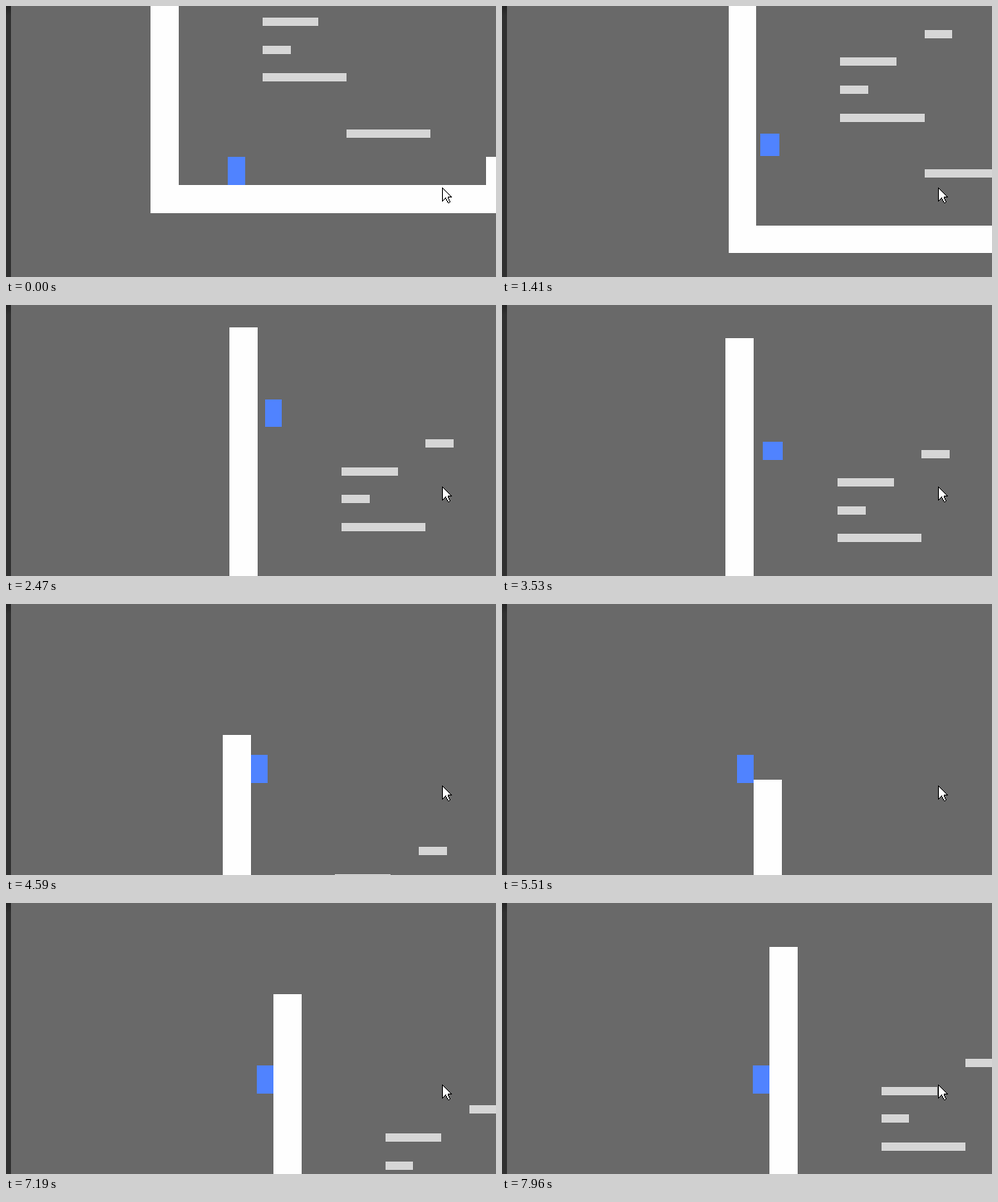
An HTML page with a canvas that plays this animation: 590x327 px, repeating every 7.99 s.

```html
<!DOCTYPE html>
<html lang="en">
<head>
<meta charset="utf-8">
<title>Wall jump</title>
<style>
  html, body { margin: 0; width: 100%; height: 100%; overflow: hidden; background: #696969; }
  canvas { display: block; }
</style>
</head>
<body>
<canvas id="stage" width="590" height="327"></canvas>
<script>
const ctx = document.getElementById('stage').getContext('2d');
const LOOP = 7990, TILE = 33.7, WALL_H = 11 * TILE;
const GRAVITY = 2000, SLIDE = 73.5;            // px/s², px/s
const BODY_W = 20.2, KICK_S = 0.278, SQUASH_S = 0.12;
const INSIDE = TILE + BODY_W / 2, OUTSIDE = -BODY_W / 2;
const STAND = -TILE / 2, ON_TOP = STAND - WALL_H;

// Smoothstep from key to key, [time, value]
function ease(keys, t) {
  if (t <= keys[0][0]) return keys[0][1];
  const i = keys.findIndex(k => k[0] > t);
  if (i < 0) return keys[keys.length - 1][1];
  const [t0, v0] = keys[i - 1], [t1, v1] = keys[i];
  const u = (t - t0) / (t1 - t0);
  return v0 + (v1 - v0) * u * u * (3 - 2 * u);
}

// Camera: wall's left edge on the stage, moved by pans of [start, end, distance]
const PANS = [[510, 1250, 98.6], [2230, 2470, -3.3], [3530, 3760, -8.3],
              [4980, 5900, 69], [6210, 6700, -8.1]];
const wallX = t => PANS.reduce((x, [a, b, dx]) => x + ease([[a, 0], [b, dx]], t), 174);

// Camera: wall's top edge, turning points; then it settles on the long slide
const TURNS = [[510, -154.7], [1050, -106.1], [1410, -106.1], [1850, 14], [2290, -8],
               [2711, 82], [3490, 40.3], [3530, 40.3], [3980, 124], [4220, 114],
               [4590, 157.9], [4740, 152], [5200, 214], [5450, 214], [6100, 128], [6210, 131]];
function wallY(t) {
  if (t < 6210) return ease(TURNS, t);
  const s = (t - 6210) / 1000;
  return 181.9 - SLIDE * s - 50.8 * Math.exp(-5.4 * s);
}

// Hops: start time, centre height from the floor, kick direction, sliding speed after the arc
const HOPS = [
  [610, STAND, 0, SLIDE],
  [1386, -79, 1, SLIDE],
  [2230, -198, 1, SLIDE],
  [3470, -197.7, 1, SLIDE],
  [4200, -286.6, 1, SLIDE],
  [4700, -321.5, 1, 0],
  [5450, ON_TOP, 0, 173],
  [5930, -311.8, -1, SLIDE],
  [LOOP, -208.8, 0, 0]
];
const RUNS = [[510, 103.5], [830, INSIDE], [4980, INSIDE], [5500, OUTSIDE]];

function player(t) {
  const x = ease(RUNS, t);
  const i = HOPS.findIndex(h => h[0] > t) - 1;
  if (i < 0) return { x, y: STAND, squash: 0 };
  const [t0, y0, kick, slide] = HOPS[i], [t1, y1] = HOPS[i + 1];
  const s = (t - t0) / 1000;

  // Launch speed that makes arc plus slide end where the next hop starts
  const net = y0 - y1 + slide * (t1 - t0) / 1000;
  const v = Math.sqrt(2 * GRAVITY * net) - slide;
  const arc = Math.min(s, (v + slide) / GRAVITY);
  const y = y0 - v * arc + GRAVITY * arc * arc / 2 + slide * (s - arc);

  const out = 1009 * s * Math.max(0, KICK_S - s);
  const squash = kick && s < SQUASH_S ? Math.sin(Math.PI * s / SQUASH_S) : 0;
  return { x: x + kick * out, y, squash };
}

function box(x, y, w, h, color) {
  const l = Math.round(x), t = Math.round(y);
  ctx.fillStyle = color;
  ctx.fillRect(l, t, Math.round(x + w) - l, Math.round(y + h) - t);
}

// Mouse arrow, row by row: outlined head, then the tail
function cursor(x, y) {
  const row = (l, r, i) => {
    box(x + l, y + i, r - l + 1, 1, '#000');
    if (r - l > 1) box(x + l + 1, y + i, r - l - 1, 1, '#fff');
  };
  for (let i = 0; i < 17; i++) row(0, i < 11 ? i : i === 11 ? 7 : 16 - i, i);
  box(x + 7, y + 11, 5, 1, '#000');
  for (let i = 12; i < 18; i++) {
    const l = 4 + Math.floor((i - 12) / 2);
    row(l, l + 3, i);
  }
  box(x + 5, y + 12, 2, 1, '#fff');
  box(x + 7, y + 18, 2, 1, '#000');
}

// Ledges in tiles: x from the wall, height above the floor, width
const LEDGES = [[7, 7, 1], [4, 6, 2], [4, 5, 1], [4, 4, 3], [7, 2, 3]];

const edge = ctx.createLinearGradient(0, 0, 0, 12);
edge.addColorStop(0, '#242424');
edge.addColorStop(1, '#303030');

function draw(t) {
  const x = wallX(t), y = wallY(t), floor = y + WALL_H;
  box(0, 0, 590, 327, '#696969');

  for (const [lx, ly, lw] of LEDGES)
    box(x + lx * TILE, floor - ly * TILE, lw * TILE, 10, '#d6d6d6');

  box(x, y, TILE, WALL_H + TILE, '#fefefe');
  box(x, floor, 900, TILE, '#fefefe');
  box(x + 12 * TILE, floor - TILE, 500, TILE, '#fefefe');

  const p = player(t), w = BODY_W + 4 * p.squash, h = TILE - 11.7 * p.squash;
  box(x + p.x - w / 2, floor + p.y - h / 2, w, h, '#5083ff');

  box(0, 0, 6, 327, edge);
  cursor(525, 219);
}

const start = performance.now();
function tick() {
  const t = (performance.now() - start) % LOOP;
  draw(Math.floor(t / 10) * 10);
  requestAnimationFrame(tick);
}
tick();
</script>
</body>
</html>
```
